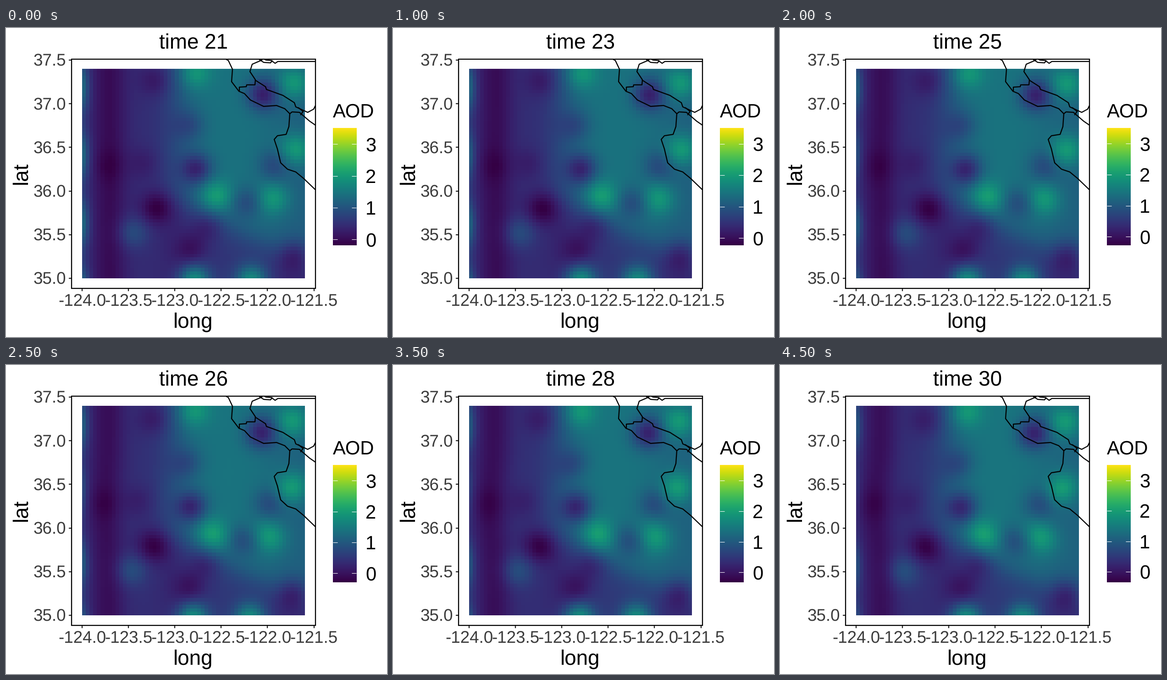
A matplotlib script that plays this animation: 831 by 674 pixels, repeating every 5 s.

```python
import numpy as np
import matplotlib.pyplot as plt
from matplotlib.animation import FuncAnimation
from matplotlib.colors import ListedColormap
from matplotlib.patches import Rectangle

W, H, DPI = 831, 674, 64
FRAMES, STEP = 10, 500
CELLS = 60
LEFT, RIGHT, TOP, BOTTOM = 166, 651.5, 89, 546      # raster
PANEL = (143, 67.5, 531.5, 500.5)                   # x, y, width, height
BAR = (712.5, 764, 218.5, 474.5)                    # left, right, top, bottom
BIG, MID, SMALL = 45.8, 41.7, 36.7                  # text sizes in pixels
LINE = 2.3
INK, TICK = "#3c3c3c", "#262626"

plt.rcParams["font.family"] = "Liberation Sans"
plt.rcParams["text.hinting"] = "none"

# viridis, slightly darkened
CMAP = ListedColormap(plt.get_cmap("viridis")(np.linspace(0, 1, 256))[:, :3] ** 1.2)

# Hills and hollows: x, y, height
BLOBS = [
    (412, 98, .17), (628, 120, .21), (632, 265, .22), (458, 367, .19),
    (583, 372, .18), (276, 446, .13), (410, 550, .36), (535, 550, .33),
    (560, 145, -.30), (325, 115, -.09), (400, 212, -.12), (415, 307, -.27),
    (300, 295, -.06), (225, 300, -.05), (583, 300, -.13), (525, 380, -.14),
    (328, 393, -.17), (440, 430, -.10), (405, 483, -.11), (630, 495, -.15),
]
SPREAD = 30

BORDERS = [
    # ocean coast, both sides of the bay
    [(478, 67), (485, 71), (494, 90), (492, 117), (508, 138), (520, 143),
     (533, 157), (562, 171), (590, 169), (608, 176), (619, 187)],
    [(619, 187), (617, 215), (611, 232), (592, 235), (585, 243), (592, 264),
     (599, 294), (614, 308), (632, 314), (649, 328), (675, 353)],
    # inland borders
    [(509, 137), (509, 129), (524, 128), (525, 124), (543, 124), (544, 113),
     (532, 95), (537, 79), (558, 70)],
    [(544, 114), (566, 128), (568, 134), (604, 147), (629, 163), (632, 172),
     (658, 184), (671, 177), (675, 169)],
    [(619, 187), (624, 183), (640, 184), (662, 203), (675, 212)],
    [(638, 174), (648, 182), (643, 189)],
    [(550, 67), (562, 75), (577, 76), (580, 72), (587, 77), (593, 73),
     (675, 73)],
    [(562, 67), (567, 70), (580, 71)],
]


def bell(d, width):
    return np.exp(-(d / width) ** 2 / 2)


def rise(d, width):
    return 1 / (1 + np.exp(-d / width))


def cell_centres(a, b):
    return a + (np.arange(CELLS) + .5) * (b - a) / CELLS


GX, GY = np.meshgrid(cell_centres(LEFT, RIGHT), cell_centres(TOP, BOTTOM))


def surface(u):
    """The field on the colour scale; it drifts west as u goes from 0 to 1."""
    x = GX + u * (6 + 13 * bell(GY - 310, 65))
    y = GY - 4 * u
    z = .17 + .27 * rise(x - 372, 22) - .08 * rise(x - 590, 25)
    z -= .12 * bell(x - 225, 26)
    z += (.19 + .1 * np.cos(2 * np.pi * (y - 130) / 148)) * bell(x - 160, 14)
    diagonal = 390 + .5 * (x - 400)
    z -= .24 * rise(y - diagonal, 20) * rise(x - 360, 20)
    for bx, by, height in BLOBS:
        z += height * bell(np.hypot(x - bx, y - by), SPREAD * .8)
    return np.clip(z + .015 * u, 0, 1)


def pt(px):
    return px * 72 / DPI


def label(x, y, text, size, color="black", **kw):
    return ax.text(x, y, text, fontsize=pt(size), color=color,
                   va="baseline", **kw)


def stroke(xs, ys, color="black", width=LINE, **kw):
    return ax.plot(xs, ys, color=color, lw=pt(width), **kw)[0]


def shade(values, box, interpolation):
    left, right, top, bottom = box
    return ax.imshow(values, cmap=CMAP, vmin=0, vmax=1, aspect="auto",
                     extent=(left, right, bottom, top),
                     interpolation=interpolation)


fig = plt.figure(figsize=(W / DPI, H / DPI), dpi=DPI, facecolor="white")
ax = fig.add_axes([0, 0, 1, 1])

raster = shade(surface(0), (LEFT, RIGHT, TOP, BOTTOM), "nearest")
shade(np.linspace(1, 0, 256)[:, None], BAR, "bilinear")
ax.set_xlim(0, W)
ax.set_ylim(H, 0)
ax.axis("off")

frame = Rectangle(PANEL[:2], *PANEL[2:], fill=False, ec="black",
                  lw=pt(LINE), zorder=4)
ax.add_patch(frame)
for border in BORDERS:
    stroke(*zip(*border), solid_joinstyle="round").set_clip_path(frame)

for i in range(6):
    x, y = 166 + 101.1 * i, 546 - 95.2 * i
    stroke([x, x], [568, 574], TICK, solid_capstyle="butt")
    stroke([137, 143], [y, y], TICK, solid_capstyle="butt")
    label(x, 607, f"{-124 + i / 2:.1f}", SMALL, INK, ha="center")
    label(131, y + 13, f"{35 + i / 2:.1f}", SMALL, INK, ha="right")

title = label(334, 45, "", BIG)
label(365, 653, "long", BIG)
label(45, 317, "lat", BIG, rotation=90, rotation_mode="anchor", ha="center")
label(713, 195, "AOD", MID)

marks = []
for n in range(4):
    dashes = [stroke([a, a + 10.3], [0, 0], "white", 1.1,
                     solid_capstyle="butt", zorder=3)
              for a in (BAR[0], BAR[1] - 10.3)]
    marks.append((n, dashes, label(784, 0, str(n), MID)))


def draw(k):
    title.set_text(f"time {21 + k}")
    raster.set_data(surface(k / (FRAMES - 1)))
    low = -.19 - .0264 * k + .0009 * k ** 2
    for n, dashes, text in marks:
        y = BAR[3] - (BAR[3] - BAR[2]) * (n - low) / (3.5 - low)
        for dash in dashes:
            dash.set_ydata([y, y])
        text.set_y(y + 15)
    return [title, raster]


anim = FuncAnimation(fig, draw, frames=FRAMES, interval=STEP,
                     init_func=lambda: draw(0), repeat=True, repeat_delay=0)
plt.show()
```
